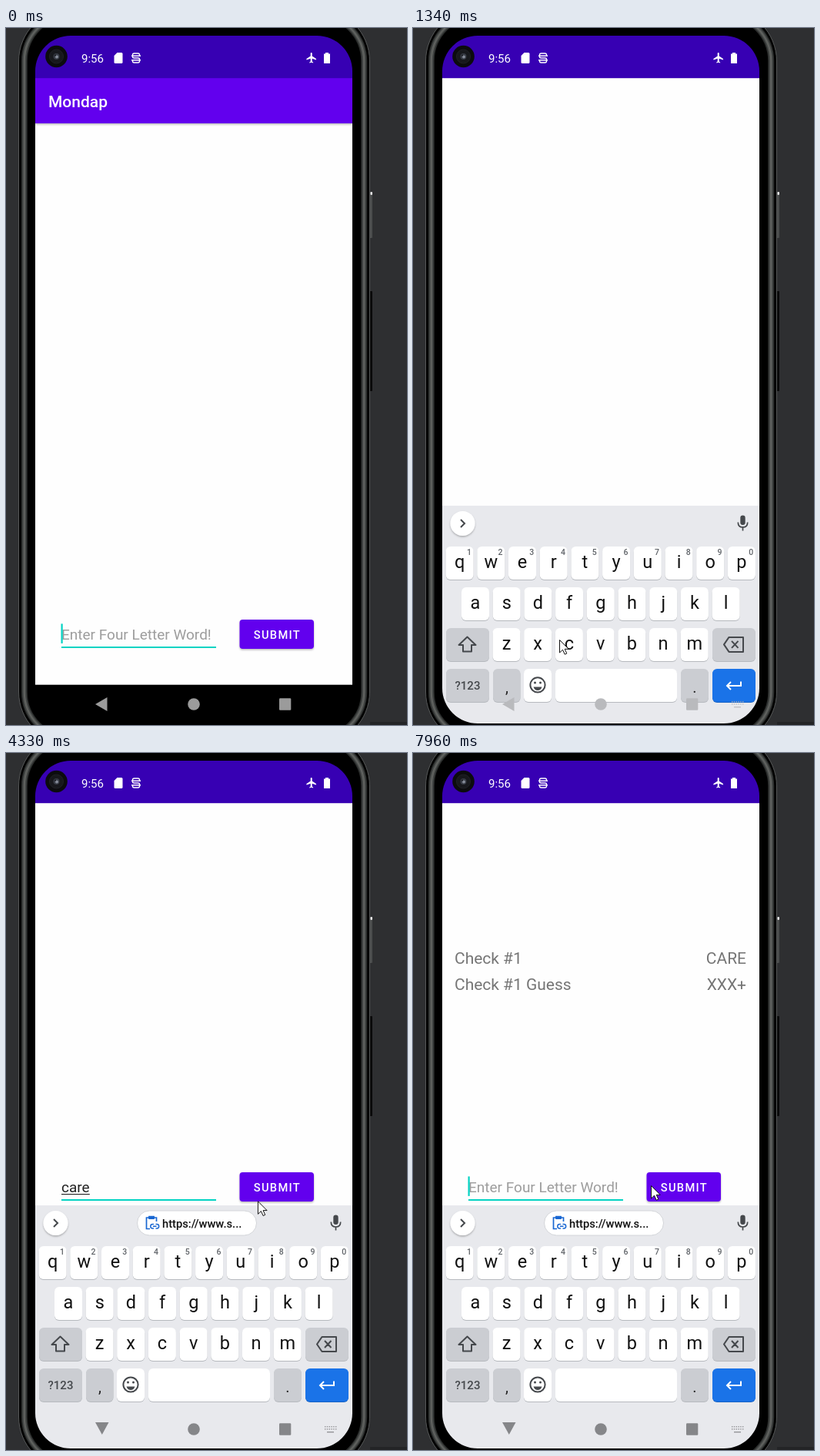
Write an HTML page that moves like this. It is 521 px wide and 906 px high and loops after 8000 ms.

```html
<!DOCTYPE html>
<html lang="en">
<head>
<meta charset="utf-8">
<title>Word game on a phone</title>
<style>
  html, body { margin: 0; width: 100%; height: 100%; overflow: hidden; background: #2e2f31; }
  svg { display: block; }
  text { font-family: Roboto, sans-serif; white-space: pre; }
  .mid { text-anchor: middle; }
  .end { text-anchor: end; }
  .medium { font-weight: 500; }
  .line { fill: none; stroke-width: 2; }
</style>
</head>
<body>
<svg id="stage" width="521" height="906" viewBox="0 0 521 906"></svg>
<script>
const LOOP = 8000;
const PITCH = 40.7;
const PAN = 224;
const KEY_TRAVEL = 318;

const box = (x, y, w, h, fill, r = 0, more = '') =>
  `<rect x="${x}" y="${y}" width="${w}" height="${h}" rx="${r}" fill="${fill}" ${more}/>`;
const label = (x, y, size, fill, str, cls = '', more = '') =>
  `<text x="${x}" y="${y}" font-size="${size}" fill="${fill}" class="${cls}" ${more}>${str}</text>`;
const path = (d, fill, more = '') => `<path d="${d}" fill="${fill}" ${more}/>`;
const line = (d, stroke, more = '') => `<path class="line" d="${d}" stroke="${stroke}" ${more}/>`;
const dot = (x, y, r, fill, more = '') => `<circle cx="${x}" cy="${y}" r="${r}" fill="${fill}" ${more}/>`;

// A key with the thin shade along its lower edge
const key = (x, y, w, fill = '#fff', shade = '#b6b9be') =>
  box(x, y + 1, w, 43, shade, 6) + box(x, y, w, 43, fill, 6);

function letterRow(letters, x, y, digits) {
  return [...letters].map((ch, i) => {
    const cx = x + i * PITCH;
    return key(cx - 18, y, 36) + label(cx, y + 28, 23.5, '#111', ch, 'mid') +
      (digits ? label(cx + 12.3, y + 11, 10.5, '#5f6368', (i + 1) % 10, 'mid medium') : '');
  }).join('');
}

const ring = (inset, fill, stroke, width) =>
  box(16.5 + inset, inset - 25, 456 - 2 * inset, 956 - 2 * inset, fill, 68 - inset,
    `stroke="${stroke}" stroke-width="${width}"`);

function phone() {
  return box(0, 0, 521, 906, '#2e2f31') + box(473, 902, 48, 4, '#232426') +
    box(472, 213, 4, 60, '#4b4d4d', 1) + box(473.5, 213, 2.5, 4, '#e6e6e6', 1) +
    box(472, 342, 4, 130, '#0a0a0a', 1) + ring(0, '#000', '#565858', 1);
}

// Black screen corners and the metal band around them
function bezel() {
  return path('M38 10h412v894h-412zM84 10a46 46 0 0 0-46 46v802a46 46 0 0 0 46 46h320a46 46 0 0 0 46-46v-802a46 46 0 0 0-46-46z',
    '#000', 'fill-rule="evenodd"') +
    ring(7.3, 'none', '#2a2c2b', 8) + ring(7.3, 'none', '#474a49', 5) + ring(7.3, 'none', '#60625f', 2);
}

function statusBar() {
  return box(38, 10, 412, 55.2, '#3700b3') +
    label(98, 45, 15, '#fff', '9:56') +
    path('M144.500 32h5.500q1.500 0 1.500 1.500v11q0 1.500-1.500 1.500h-8q-1.500 0-1.500-1.500v-8.500z', '#fff') +
    line('M173.500 36.300v-1.300q0-2-2-2h-5q-2 0-2 2v2.500q0 1.500 2 1.500h5q2 0 2 1.500v2.500q0 2-2 2h-5q-2 0-2-2v-1.300M163 36.300h12M163 41.700h12',
      '#fff', 'style="stroke-width:1.400"') +
    path('M403 41.500v-1.500l-5.300-3.400v-3.600q0-1-1-1t-1 1v3.600l-5.300 3.400v1.500l5.300-1.700v3.700l-1.400 1v1l2.400-.7 2.400.7v-1l-1.400-1v-3.700z', '#fff') +
    path('M415 32h4v1.500h2v12.500h-8v-12.500h2z', '#fff') +
    dot(65.5, 37, 14.3, '#0c0c0e') + dot(65.5, 37, 9, '#17181c', 'stroke="#202126"') +
    dot(65.5, 37, 4, '#383c46') + dot(66, 37.5, 2, '#858b98') + dot(64, 35.5, 1, '#15161a');
}

function content() {
  return box(38, 65, 412, 1000, '#fefefe') +
    box(38, 60, 412, 63.9, '#6200ee', 0, 'filter="url(#soft)"') +
    label(55, 103, 20.97, '#fff', 'Mondap', 'medium') +
    `<g id="results">` +
    [['Check #1', 'CARE', 497.5], ['Check #1 Guess', 'XXX+', 531.5]].map(([a, b, y]) =>
      label(54, y, 20.97, '#757575', a) + label(433, y, 20.97, '#757575', b, 'end')).join('') +
    `</g>` +
    label(72, 795, 19, '#9d9d9d', 'Enter Four Letter Word!', '', 'id="hint"') +
    label(72, 795, 19, '#222', '', '', 'id="typed"') +
    box(72, 797, 0, 1.1, '#222', 0, 'id="compose"') +
    box(72, 804, 201, 2, '#03d3c3') +
    box(71.5, 774.4, 2.2, 25.5, '#03d3c3', 0, 'id="caret"') +
    box(303.5, 769, 96.5, 38, '#6200ee', 4, 'filter="url(#soft)"') +
    dot(340, 788, 0, '#fff', 'id="ripple" clip-path="url(#button)"') +
    label(352.4, 794, 14.68, '#fff', 'SUBMIT', 'mid medium', 'letter-spacing="1.31"');
}

function keyboard() {
  const ink = '#45484c', grey = '#cbcdd2';
  return box(38, 588, 412, 420, '#e8e9ed') +
    dot(64.5, 611, 16, '#fff', 'filter="url(#soft)"') +
    line('M62 606l5 5-5 5', ink) +
    box(425.3, 600.5, 6.4, 12.5, ink, 3.2) +
    line('M422.300 609.500q0 6.500 6.200 6.500t6.200-6.500M428.500 616v4.500', ink, 'style="stroke-width:1.700"') +
    `<g id="chip">` + box(170.5, 595, 155, 32, '#fff', 16, 'stroke="#d3d5d9"') +
    line('M187 618.500h-4.500v-14.500h13v5M186 604v-1.500h6v1.500', '#1967d2', 'style="stroke-width:1.700"') +
    box(185, 602, 8, 4, '#1967d2', 1) +
    line('M192 612.500h-1.500a2.700 2.700 0 0 0 0 5.400h1.500M194.500 612.500h1.500a2.700 2.700 0 0 1 0 5.400h-1.500M191 615.200h4.500',
      '#1967d2', 'style="stroke-width:1.500"') +
    label(203, 616.5, 14.7, '#111', 'https://www.s...', 'medium') + `</g>` +
    letterRow('qwertyuiop', 60.6, 641, true) +
    letterRow('asdfghjkl', 81, 694) +
    letterRow('zxcvbnm', 121.5, 747) +
    key(43, 747, 56, grey) + key(389, 747, 56, grey) +
    line('M70.500 758.500l-11 10.500h5.500v8.500h11v-8.500h5.500z', ink, 'stroke-linejoin="round"') +
    line('M404 768.500l6.500-9.500h18.500v19h-18.500zM414 764l8.500 9M422.500 764l-8.500 9', ink, 'stroke-linejoin="round"') +
    key(43, 800, 56, grey) + label(71, 827, 15, ink, '?123', 'mid medium') +
    key(104, 800, 35.5, grey) + label(122, 831, 20, '#222', ',', 'mid') +
    key(144, 800, 36) + dot(162, 821, 9.6, 'none', `stroke="${ink}" stroke-width="2"`) +
    dot(158.5, 818, 1.5, ink) + dot(165.5, 818, 1.5, ink) +
    path('M156.500 823.500h11q-1.500 4.500-5.500 4.500t-5.500-4.500z', ink) +
    key(185, 800, 158) +
    key(348, 800, 36, grey) + label(366, 831, 20, '#222', '.', 'mid') +
    key(389, 800, 56, '#1a73e8', '#1762c4') +
    line('M426 816.500v5.500h-18M413 817l-5 5 5 5', '#fff');
}

function navIcons() {
  let keys = box(417, 882, 9, 1.4, 'currentColor');
  for (let i = 0; i < 12; i++)
    keys += box(414 + (i % 6) * 2.8, 875 + Math.floor(i / 6) * 3.2, 1.4, 1.4, 'currentColor');
  return `<g id="nav">` +
    path('', 'currentColor', 'id="back"') +
    dot(244, 879, 7.8, 'currentColor') + box(355, 871.3, 15.3, 15.5, 'currentColor', 1.2) +
    `<g id="switcher" opacity=".85">${keys}</g></g>`;
}

const stage = document.getElementById('stage');
stage.innerHTML = `<defs>
  <clipPath id="screen"><rect x="38" y="10" width="412" height="894"/></clipPath>
  <clipPath id="button"><rect x="303.500" y="769" width="96.500" height="38" rx="4"/></clipPath>
  <filter id="soft" x="-20%" y="-20%" width="140%" height="150%">
    <feDropShadow dx="0" dy="1.500" stdDeviation="1.300" flood-opacity=".28"/></filter>
</defs>` + phone() +
  `<g clip-path="url(#screen)"><g id="content">${content()}</g>` +
  statusBar() + box(38, 853.7, 412, 52, '#000') +
  `<g id="keyboard">${keyboard()}</g>${navIcons()}</g>` + bezel() +
  path('M.500.500v16.500l4-3.800 2.700 6 2.600-1.200-2.600-5.700h5z', '#fff',
    'id="mouse" stroke="#111" stroke-linejoin="round"');

const el = {};
stage.querySelectorAll('[id]').forEach(n => el[n.id] = n);
const set = (name, attrs) => {
  for (const k in attrs) el[name].setAttribute(k, attrs[k]);
};
const show = (name, on) => set(name, { visibility: on ? 'visible' : 'hidden' });
const clamp = v => Math.min(1, Math.max(0, v));
const snap = (t, from, step) => from + Math.floor((t - from) / step + 1e-6) * step;
const easeOut = p => 1 - (1 - p) ** 2;
const smooth = p => p * p * (3 - 2 * p);

// cubic-bezier(.4, 0, .2, 1)
function standard(x) {
  let lo = 0, hi = 1;
  for (let i = 0; i < 24; i++) {
    const s = (lo + hi) / 2, r = 1 - s;
    if (1.2 * r * r * s + 0.6 * r * s * s + s ** 3 < x) lo = s; else hi = s;
  }
  return smooth(lo);
}

// Moments at which the caret turns off, on, off ...
const blinks = [440, 930, 1470, 1980, 2450, 2850, 4140, 4670, 5230, 5700, 6240, 6700, 7240, 7700];
const typing = [[2850, 'c', 9.9], [3060, 'ca', 20.2], [3450, 'car', 26.7], [3650, 'care', 36.8]];
const SUBMITTED = 4740;

function mouseAt(t) {
  if (t < 3720) {
    const p = clamp((snap(t, 150, 73) - 150) / 511);
    return [421 - 231 * easeOut(p), 889 - 94 * easeOut(p)];
  }
  if (t < 7510) {
    const p = smooth(clamp((snap(t, 3650, 69) - 3650) / 759));
    return [190 + 150 * p, 795 - 233 * p];
  }
  return [t < 7900 ? 338 : t < 7960 ? 325 : 309, 562];
}

function draw(t) {
  const k = snap(t, 1210, 65);
  const rise = standard(clamp((k - 1119) / 352));
  const pan = PAN * easeOut(clamp((k - 1275) / 310));
  set('keyboard', {
    transform: `translate(0 ${(KEY_TRAVEL * (1 - rise)).toFixed(2)})`,
    opacity: clamp((k - 1190) / 125)
  });
  set('content', { transform: `translate(0 ${-pan.toFixed(2)})` });
  show('chip', t >= 1530);

  el.nav.style.color = t < 1210 ? '#9b9b9b' : t < 1280 ? '#a8a8a8' : t < 1400 ? '#b9babd' : '#858689';
  set('back', { d: t < 1400 ? 'M116 879l15.500-9v18z' : 'M116 870h17.500l-8.700 16z' });
  show('switcher', t >= 1150);

  const done = t >= SUBMITTED;
  const [, word, width] = (!done && typing.filter(s => t >= s[0]).pop()) || [0, '', 0];
  el.typed.textContent = word;
  set('compose', { width });
  show('hint', !word);
  show('results', done);
  set('caret', { x: 71.5 + width });
  show('caret', blinks.filter(b => t >= b).length % 2 === 0);

  const r = snap(t, 4530, 70);
  set('ripple', {
    r: t < 4530 ? 0 : 12 + 60 * clamp((r - 4530) / 225),
    opacity: t >= 5370 ? 0 : 0.18 * (1 - clamp((r - 5010) / 380))
  });

  const [x, y] = mouseAt(t);
  set('mouse', { transform: `translate(${x.toFixed(1)} ${y.toFixed(1)})` });
  show('mouse', t >= 150);
}

const begin = performance.now();
function tick() {
  draw((performance.now() - begin) % LOOP);
  requestAnimationFrame(tick);
}
tick();
</script>
</body>
</html>
```
